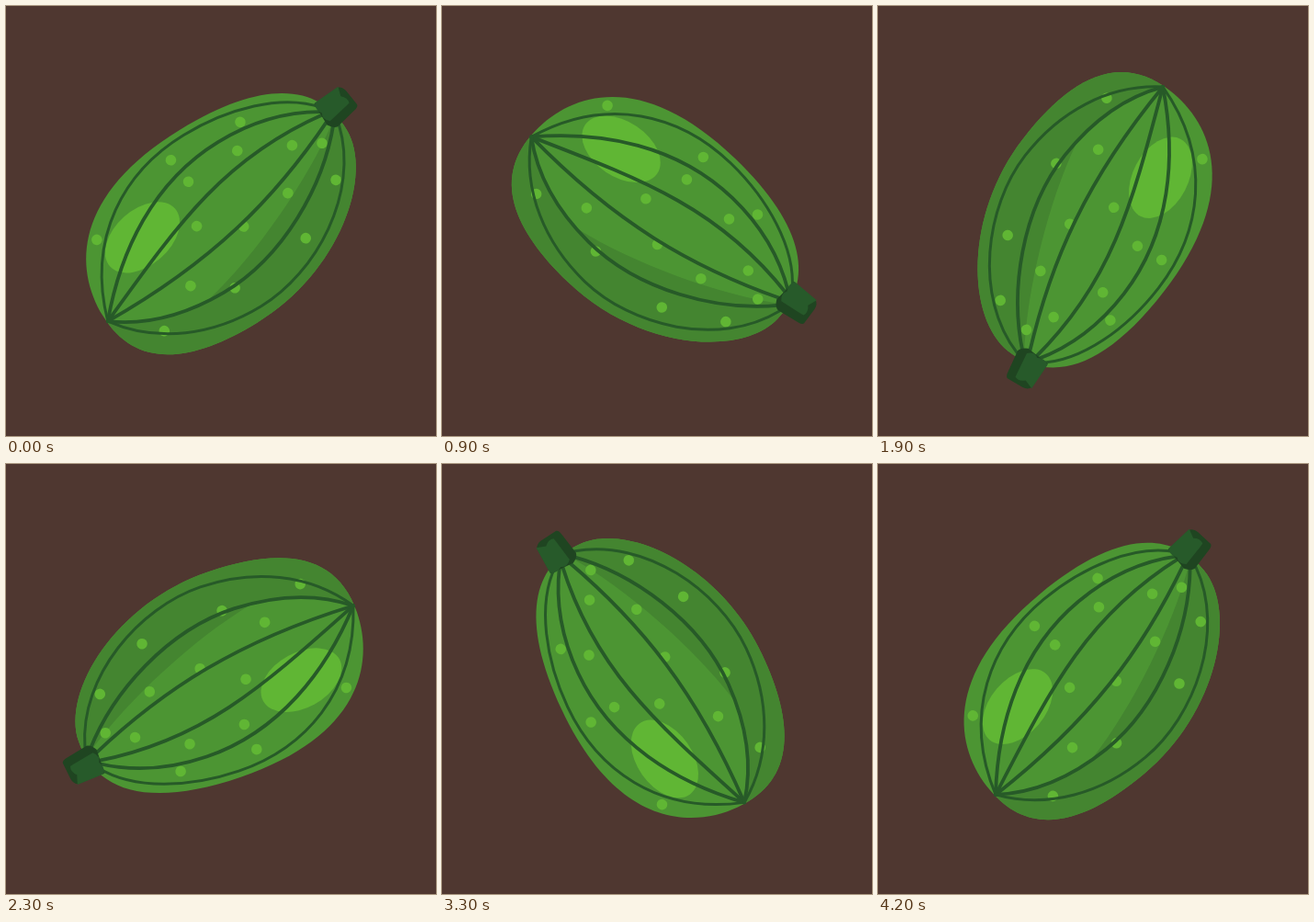
Animation, 468 px wide and 468 px high, one loop 4300 ms. Source, as an HTML page:

```html
<!DOCTYPE html>
<html lang="en">
<head>
<meta charset="utf-8">
<title>Rolling squash</title>
<style>
  html, body { margin: 0; width: 100%; height: 100%; overflow: hidden; background: #4f3730; }
  svg { display: block; width: 100%; height: 100%; }
</style>
</head>
<body>
<svg viewBox="0 0 468 468">
  <defs>
    <path id="body" d="M220 65.5C278 65.5 349 153 349 258C349 340 325 397.5 255 397.5C195 397.5 126 357 126 220C126 111 164 65.5 220 65.5Z"/>
    <clipPath id="inside"><use href="#body"/></clipPath>
  </defs>
  <g id="squash">
    <use href="#body" fill="#4c9533"/>
    <path clip-path="url(#inside)" fill="#448530" d="M205 74C245 130 285 220 300 290C298 335 282 370 263 396V420H380V50H205Z"/>
    <ellipse rx="30" ry="47.3" transform="translate(204.7 316.3) rotate(-10)" fill="#60b634"/>
    <g id="dots" fill="#60b634"></g>
    <g fill="none" stroke="#275a28" stroke-linecap="round">
      <g stroke-width="3">
        <path d="M186 76C150 105 133 165 133 220C133 295 172 368 263 396"/>
        <path d="M212 70C287 90 336 175 336 245C336 305 312 362 263 396"/>
      </g>
      <g stroke-width="3.8">
        <path d="M190 78C170 110 159 150 159 192C159 275 205 345 263 396"/>
        <path d="M193 78C177 195 212 275 263 396"/>
        <path d="M201 78C244 172 267 265 263 396"/>
        <path d="M207 74C259 118 303 196 302 272C301 330 283 370 263 396"/>
      </g>
    </g>
    <path fill="#1f4521" d="M176 50Q178 45 184 44L203 41.5Q206 42 207 48L212.5 72Q212 77 205 81L178 81Z"/>
    <path fill="#275a2a" d="M175.5 49L186 52Q191 46 197 48L198 52L203 76Q197 83 191 79Q184 84 177.5 80Z"/>
  </g>
</svg>
<script>
  const LOOP = 4300, STEP = 100, UPRIGHT_AT = 3600;
  const squash = document.getElementById('squash');
  const spots = [
    [219, 96], [261, 104], [204, 125], [246, 156], [298, 165],
    [153, 160], [178, 179], [252, 216], [149, 246], [179, 242],
    [225, 259.5], [304, 259], [277, 299], [304, 349], [181, 360]
  ];
  document.getElementById('dots').innerHTML =
    spots.map(([x, y]) => `<circle cx="${x}" cy="${y}" r="5.8"/>`).join('');

  function draw() {
    const time = Math.floor(performance.now() % LOOP / STEP) * STEP;
    const angle = (time - UPRIGHT_AT) / LOOP * 360;
    squash.setAttribute('transform', `rotate(${angle} 234 234)`);
    requestAnimationFrame(draw);
  }
  draw();
</script>
</body>
</html>
```
